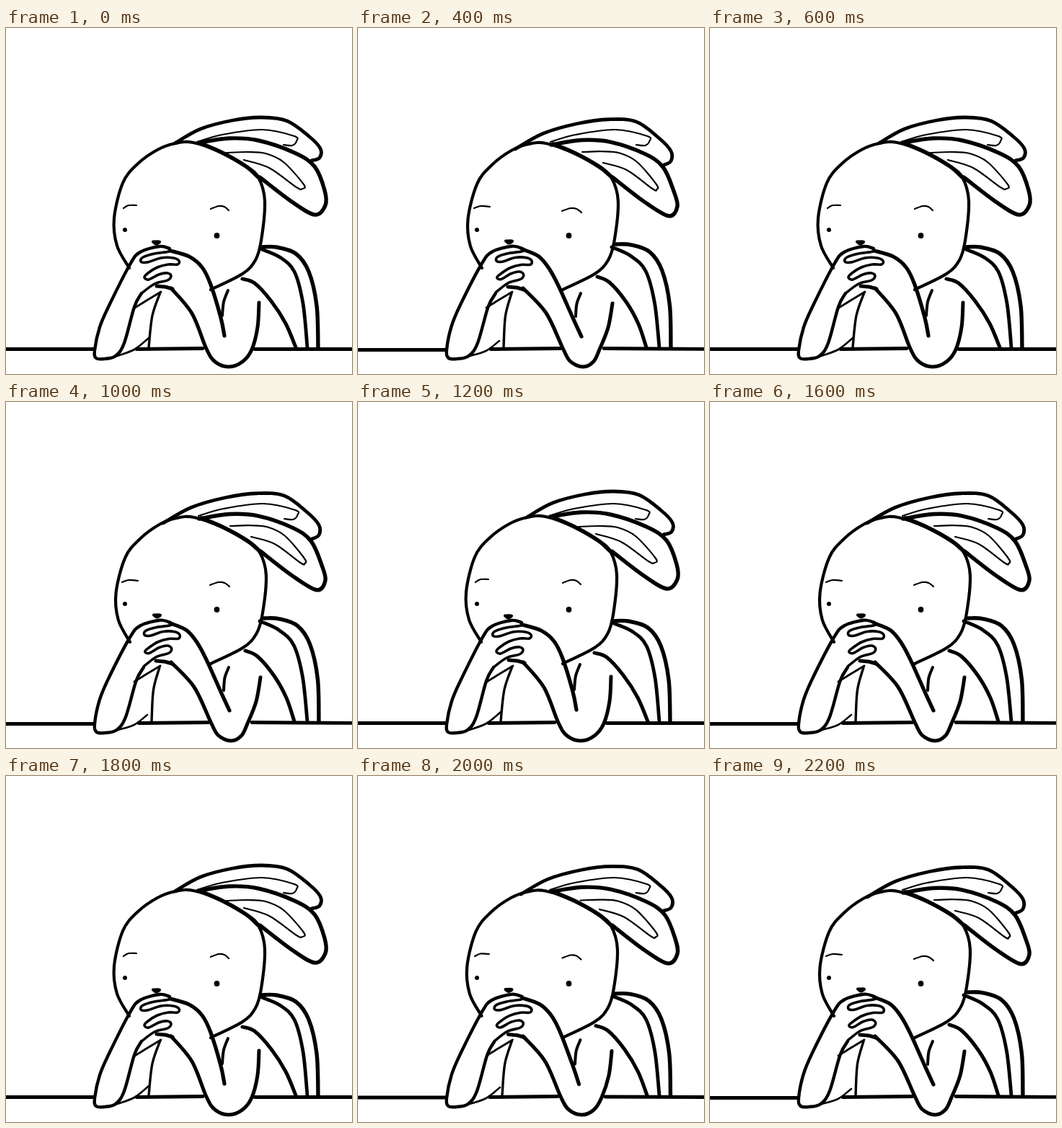
An HTML page that plays this animation: 480 by 480 pixels, repeating every 2400 ms.

```html
<!DOCTYPE html>
<html lang="en">
<head>
<meta charset="utf-8">
<title>Pondering rabbit</title>
<style>
  html, body { margin: 0; width: 100%; height: 100%; overflow: hidden; background: #fff; }
  svg { display: block; width: 100vw; height: 100vh; }
  path { fill: none; stroke: #000; stroke-linecap: round; stroke-linejoin: round; }
  .pose { visibility: hidden; animation: hold 600ms step-end infinite; }
  .pose:nth-child(2) { animation-delay: -400ms; }
  .pose:nth-child(3) { animation-delay: -200ms; }
  @keyframes hold {
    0% { visibility: visible; }
    33.3333%, 100% { visibility: hidden; }
  }
</style>
</head>
<body>
<svg id="stage" viewBox="0 0 480 480"></svg>
<script>
const parse = s => s.split(' ').map(p => p.split(',').map(Number));

// Value at u (0..1) along evenly spaced offsets.
function along(offsets, u) {
  const x = u * (offsets.length - 1);
  const i = Math.floor(x);
  const a = offsets[i];
  const b = offsets[i + 1] || a;
  return a.map((v, k) => v + (b[k] - v) * (x - i));
}

// Smooth curve through the points.
function curve(p) {
  const at = i => p[Math.max(0, Math.min(p.length - 1, i))];
  let d = 'M' + p[0];
  for (let i = 0; i < p.length - 1; i++) {
    const [a, b, c, e] = [at(i - 1), at(i), at(i + 1), at(i + 2)];
    const leave = b.map((v, k) => v + (c[k] - a[k]) / 6);
    const arrive = c.map((v, k) => v - (e[k] - b[k]) / 6);
    d += `C${leave} ${arrive} ${c}`;
  }
  return d;
}

// Strokes drift along their length as the pose goes from 0 to 1.
function pose(t) {
  const line = (width, points, drift) => {
    const offsets = parse(drift);
    const p = parse(points).map((pt, i, all) => {
      const o = along(offsets, i / (all.length - 1));
      return pt.map((v, k) => v + o[k] * t);
    });
    return `<path stroke-width="${width}" d="${curve(p)}"/>`;
  };
  const dot = (x, y, r) => `<circle cx="${x}" cy="${y}" r="${r}"/>`;

  const table =
    line(5, '-5,445.5 122,445.5', '0,1') +
    line(4.8, '181,445.5 273,444.5', '3,0 8,0') +
    line(4.8, '345,445.5 485,445.5', '-4,-1 0,0');

  const chair =
    line(5.4, '353,304 375,304 402,313 420,338 431,385 433,443', '5,-4 2,-2 1,0') +
    line(4.8, '355,307 380,318 400,338 412,382 418,443', '-3,-3 -1,-1 0,0') +
    line(5, '328,348 345,354 368,379 388,410 402,443', '4,-3 4,1 -2,0');

  const head =
    line(4.2, '171,333 154,302 150,264 162,215 182,189 210,169 235,160 260,159 ' +
      '300,173 333,192 350,207 359,240 354,295 346,322 328,341 284,363',
      '1,0 4,1 0,1 2,0 0,0') +
    line(5.6, '270,160 300,173 333,192 350,207', '1,1 2,0');

  const ears =
    line(4.8, '234,160 270,140 315,128 355,124 390,129 420,150 436,167 435,180 424,184',
      '-16,8 -4,1 0,6') +
    line(2.2, '265,158 300,148 355,141 400,150 403,157 397,163 385,162', '2,0 1,0') +
    line(5.4, '268,159 310,153 350,156 400,173 428,192 442,225 443,246 428,259 395,240 352,207',
      '0,3 0,2 -6,1 3,2 1,0') +
    line(2.2, '306,173 335,172 360,174 385,186 413,217 411,223 403,221 365,194 330,183',
      '5,-1 1,0 10,4');

  const face =
    line(2.2, '163,250 170,246 181,246', '-2,0 2,2') +
    line(2.2, '284,251 295,247 303,248 309,253', '-1,3 1,3') +
    line(4, '204,296.5 213,296.5 208,299.5 204,296.5', '1,-1') +
    dot(165, 280, 3) + dot(292.5, 288, 3.9);

  const body =
    line(4, '308,364 302,380 300,399', '1,4 2,1') +
    line(2.8, '179,388 195,378 215,366', '-1,0') +
    line(3.4, '214,367 203,399 198,443', '-1,1 4,0') +
    line(2.6, '154,455 178,446 198,430', '1,0 -2,4');

  const arms =
    line(4.4, '227,306 213,303 186,311 172,328 143,385 130,415 123,447 125,458 ' +
      '136,459 152,455 164,437 178,387 188,368',
      '1,0 -1,-1 1,0 3,0') +
    line(5.2, '228,309 254,317 272,332 284,356 298,402 303,427', '0,-2 -9,2 7,1') +
    line(5, '229,361 258,396 278,445 290,463 309,470 328,463 341,446 349,415 351,381',
      '0,0 6,-1 3,0 -6,0 2,1');

  const fingers =
    line(3.6, '227,306 226,310 206,313 190,318 187,324 196,325 215,319 232,319 240,323 ' +
      '238,328 225,328 210,332 197,340 192,346 198,349 212,342 224,340 229,344 ' +
      '224,350 206,355 188,368',
      '1,0 5,-1 1,0 1,1 0,-2 3,-1') +
    line(5, '209,358 220,359 231,362', '-1,1');

  return `<g class="pose">${table}${chair}${head}${ears}${face}${body}${arms}${fingers}</g>`;
}

document.getElementById('stage').innerHTML = [0, 0.5, 1].map(pose).join('');
</script>
</body>
</html>
```
